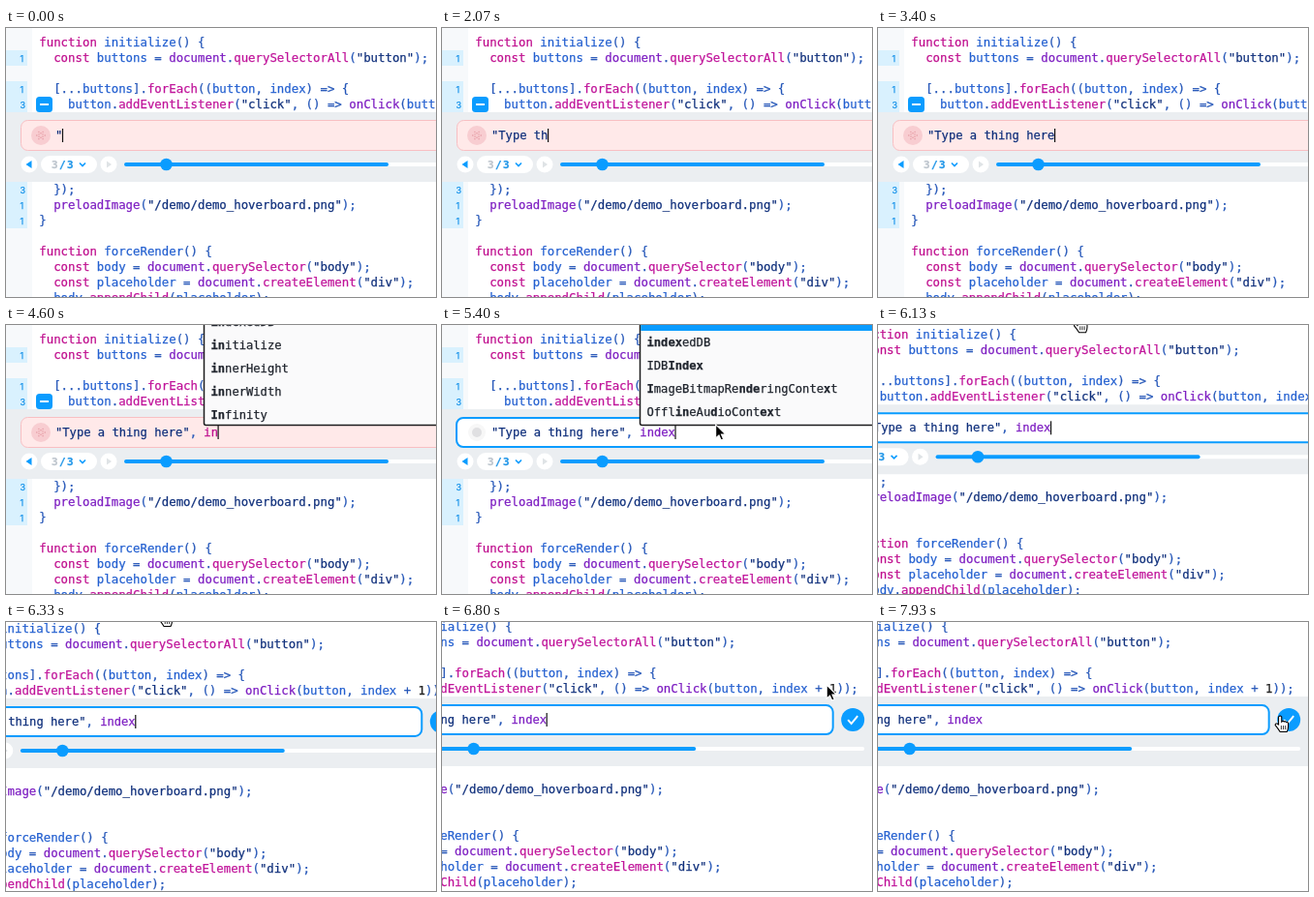
These frames come from a looping animation (444 by 278 pixels, 8000 ms). An HTML page with a canvas:

```html
<!DOCTYPE html>
<html lang="en">
<head>
<meta charset="utf-8">
<title>Live expression editor</title>
<style>
  html, body { margin: 0; height: 100%; overflow: hidden; background: #fff; }
  canvas { display: block; }
</style>
</head>
<body>
<canvas id="stage" width="444" height="278"></canvas>
<script>
const ctx = document.getElementById('stage').getContext('2d');
const LOOP = 8000, FPS = 15;
const MONO = '"DejaVu Sans Mono", monospace';
const BLUE = '#0a9cff';
const COLORS = {
  keyword: '#c0108f', global: '#7e1fc2', local: '#2460d0', prop: '#c0149a',
  string: '#10307c', punct: '#2456b8', number: '#222'
};

// [row centre, hit count, code]
const LINES = [
  [15, '', 'function initialize() {'],
  [31, '1', '  const buttons = document.querySelectorAll("button");'],
  [63, '1', '  [...buttons].forEach((button, index) => {'],
  [79, '3', '    button.addEventListener("click", () => onClick(button, index + 1));'],
  [167, '3', '  });'],
  [183, '1', '  preloadImage("/demo/demo_hoverboard.png");'],
  [199, '1', '}'],
  [231, '', 'function forceRender() {'],
  [247, '', '  const body = document.querySelector("body");'],
  [263, '', '  const placeholder = document.createElement("div");'],
  [279, '', '  body.appendChild(placeholder);']
];

const PHRASE = '"Type a thing here", ';
const TYPING = [
  [0, '"'], [530, '"T'], [800, '"Ty'], [930, '"Typ'], [1070, '"Type'], [1270, '"Type '],
  [1400, '"Type t'], [1470, '"Type th'], [1600, '"Type thi'], [2070, '"Type th'],
  [2200, '"Type t'], [2330, '"Type '], [2530, '"Type a'], [2870, '"Type a '],
  [2930, '"Type a th'], [3070, '"Type a thin'], [3130, '"Type a thing '],
  [3270, '"Type a thing h'], [3330, '"Type a thing he'], [3400, '"Type a thing here'],
  [3530, '"Type a thing here"'], [3800, '"Type a thing here",'], [4330, PHRASE],
  [4530, PHRASE + 'i'], [4600, PHRASE + 'in'], [4670, PHRASE + 'inde'], [4730, PHRASE + 'index']
];
const SHORT_LIST = ['indexedDB', 'initialize', 'innerHeight', 'innerWidth', 'Infinity'];
const LONG_LIST = ['index', 'indexedDB', 'IDBIndex', 'ImageBitmapRenderingContext', 'OfflineAudioContext'];

// [time, x, y]
const POINTER = [
  [5130, 290, 165], [5800, 270, -4], [6330, 270, -4], [6800, 530, 75], [7200, 548, 107]
];
const HAND = new Path2D('M-1.6 9V1Q0-1 1.6 1V6Q3 4.6 4 6Q5.6 5 6.4 6.6Q8.4 6 8.4 8V11Q8.4 14 7 16.5H0Q-2 13-5 9.5Q-5 7.5-3 8Z');
const ARROW = new Path2D('M0 0V14L3.3 11L5.5 16L8 15L5.8 10H10Z');

function rect(x, y, w, h, fill, radius = 0, stroke, line = 1) {
  ctx.beginPath();
  ctx.roundRect(x, y, w, h, radius);
  ctx.fillStyle = fill;
  ctx.fill();
  if (stroke) {
    ctx.strokeStyle = stroke;
    ctx.lineWidth = line;
    ctx.stroke();
  }
}

const disc = (x, y, r, fill) => rect(x - r, y - r, 2 * r, 2 * r, fill, r);

function poly(points, color, line) {
  ctx.beginPath();
  points.forEach(([x, y]) => ctx.lineTo(x, y));
  ctx.fillStyle = ctx.strokeStyle = color;
  ctx.lineWidth = line;
  if (line) ctx.stroke(); else ctx.fill();
}

// The thin outline gives a medium weight
function text(str, x, y, font, color) {
  ctx.font = font;
  ctx.fillStyle = ctx.strokeStyle = color;
  ctx.lineWidth = 0.25;
  ctx.fillText(str, x, y);
  ctx.strokeText(str, x, y);
}

function drawCode(code, x, y, size, wordColor = COLORS.local) {
  const step = size * 0.602;
  for (const { 0: token, index } of code.matchAll(/"[^"]*"?|\w+|[^\w"]+/g)) {
    let color = COLORS.punct;
    if (token[0] === '"') color = COLORS.string;
    else if (/^\d/.test(token)) color = COLORS.number;
    else if (/^(function|const|in)$/.test(token)) color = COLORS.keyword;
    else if (/^(document|preloadImage|onClick)$/.test(token)) color = COLORS.global;
    else if (/^\w/.test(token)) color = /[^.]\.$/.test(code.slice(0, index)) ? COLORS.prop : wordColor;
    text(token, x + index * step, y, `${size}px ${MONO}`, color);
  }
}

function drawEditor(foldable) {
  rect(0, 0, 27, 300, '#f7f9fb');
  for (const [y, count, code] of LINES) {
    if (count) {
      rect(0, y - 8, 22, 16, '#d9f1fe');
      text(count, 14.5, y + 3.5, '9px Inter, sans-serif', '#1893ea');
    }
    drawCode(code, 34.3, y + 4, 12.36);
  }
  if (foldable) {
    rect(31, 71, 17, 16, BLUE, 3.5);
    rect(35, 78, 9, 2, '#fff');
  }
}

function drawSlider() {
  disc(24, 141, 8.5, '#fff');
  poly([[20.5, 141], [26.5, 137], [26.5, 145]], BLUE);
  rect(36, 132, 58, 18, '#fff', 9);
  text('3', 47, 145, `bold 11px ${MONO}`, '#bcc4cc');
  text('/', 55, 145, `bold 11px ${MONO}`, '#2196e8');
  text('3', 63, 145, `bold 11px ${MONO}`, '#2196e8');
  poly([[76, 139.5], [79, 142.5], [82, 139.5]], BLUE, 1.6);
  disc(106, 141, 8.5, '#fff');
  poly([[109, 141], [104, 137.5], [104, 144.5]], '#dfe3e6');
  rect(122, 139, 447, 4, '#fff', 2);
  rect(122, 139, 273, 4, BLUE, 2);
  disc(165.5, 141, 6.3, BLUE);
}

function drawInput(value, valid, caret) {
  rect(0, 87, 600, 72, '#ebeef1');
  if (valid) {
    rect(15, 96, 521.5, 30, '#fff', 7, BLUE, 2);
    disc(36, 111, 9, '#f7f7f7');
    disc(36, 111, 5, '#e0e0e2');
  } else {
    rect(15.5, 95.5, 521, 31, '#ffe9e9', 7, '#f8bfc3');
    disc(36, 111, 10, '#f8cdd1');
    for (let i = 0; i < 12; i++) {
      const a = i * Math.PI / 6, r = i % 2 ? 2.3 : 4.2;
      disc(36 + r * Math.cos(a), 111 + r * Math.sin(a), 0.7, '#e2939d');
    }
  }
  disc(557, 111, 12, BLUE);
  poly([[552, 111], [555.5, 115], [562, 107]], '#fff', 2);
  drawCode(value, 51, 115, 12.13, COLORS.global);
  ctx.globalAlpha = caret;
  rect(50.6 + value.length * 7.3, 104, 1.2, 14, '#111');
  ctx.globalAlpha = 1;
}

function drawPopup(query) {
  const long = query.length > 2;
  rect(204.5, -40, 400, 143.5, '#fafafb', 2, '#1c1c1e', 1.5);
  if (long) rect(205.2, -39, 400, 45, BLUE);
  (long ? LONG_LIST : SHORT_LIST).forEach((name, row) => {
    const lower = name.toLowerCase();
    const start = Math.max(0, lower.indexOf(query));
    const y = row * 24 + (long ? -2 : 0.5);
    let matched = 0;
    [...name].forEach((char, i) => {
      const hit = i >= start && lower[i] === query[matched];
      if (hit) matched++;
      text(char, 211.5 + i * 7.3, y, `${hit ? 'bold ' : ''}12.13px ${MONO}`,
        long && !row ? '#fff' : '#20252e');
    });
  });
}

function drawPointer(t) {
  const next = POINTER.findIndex(key => key[0] > t);
  const b = POINTER.at(next), a = next > 0 ? POINTER[next - 1] : b;
  const u = a === b ? 0 : (t - a[0]) / (b[0] - a[0]);
  const ease = u * u * (3 - 2 * u);
  const x = a[1] + (b[1] - a[1]) * ease, y = a[2] + (b[2] - a[2]) * ease;
  const shape = y < 60 || x > 544 ? HAND : ARROW;
  ctx.save();
  ctx.translate(x, y);
  ctx.fillStyle = shape === HAND ? '#fff' : '#000';
  ctx.strokeStyle = shape === HAND ? '#000' : '#fff';
  ctx.lineWidth = 1.1;
  ctx.fill(shape);
  ctx.stroke(shape);
  if (shape === HAND) [1.2, 3.4, 5.6].forEach(k => poly([[k, 10], [k, 14]], '#000', 0.8));
  ctx.restore();
}

// Critically damped camera pan
function panAmount(t) {
  if (t < 5990) return 0;
  const k = 7 * (Math.min(t, 6800) - 5915) / 1000;
  return 1 - (1 + k) * Math.exp(-k);
}

function draw(t) {
  const value = TYPING.findLast(key => key[0] <= t)[1];
  const valid = t >= 3530 && t < 3800 || t >= 4730;
  const caret = t >= 330 && t < 530 || t >= 7930 ? 0 : t >= 7730 ? 0.5 : 1;
  const pan = panAmount(t);

  ctx.setTransform(1, 0, 0, 1, 0, 0);
  rect(0, 0, 444, 278, '#fff');
  ctx.translate(-134.8 * pan, -10.1 * pan);
  drawEditor(t < 5130);
  drawInput(value, valid, caret);
  drawSlider();
  if (t >= 4530 && t < 6070) drawPopup(value.slice(PHRASE.length));
  if (t >= 5130) drawPointer(t);
}

function frame(now) {
  const tick = Math.floor((now % LOOP + 5) * FPS / 1000);
  draw(tick * 1000 / FPS + 5);
  requestAnimationFrame(frame);
}
requestAnimationFrame(frame);
</script>
</body>
</html>
```
